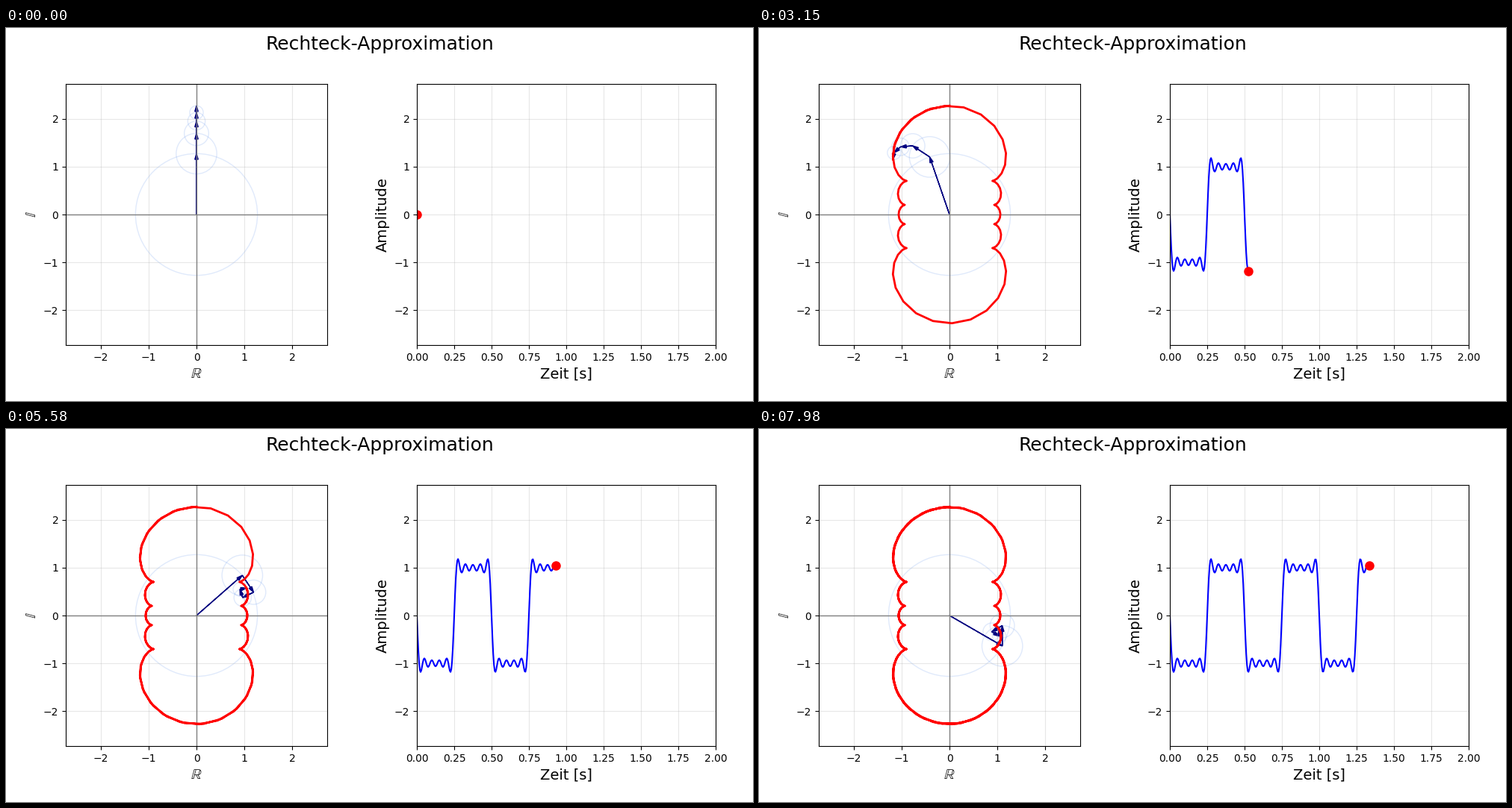
A matplotlib script that plays this animation: 1000x500 px, repeating every 8000 ms.

```python
import numpy as np
import matplotlib.pyplot as plt
from matplotlib.animation import FuncAnimation

LOOP_MS = 8000
FRAMES = 267
FREQ = 2.0
ORDERS = np.arange(1, 10, 2)
RADII = 4 / (np.pi * ORDERS)
LIMIT = 1.2 * RADII.sum()

times = np.linspace(0, 2, 400)
phases = 2 * np.pi * FREQ * np.outer(times, ORDERS)
vectors = 1j * RADII * np.exp(1j * phases)
joints = np.hstack([np.zeros((len(times), 1)), np.cumsum(vectors, axis=1)])
tips = joints[:, -1]

fig = plt.figure(figsize=(10, 5), dpi=100)
fig.suptitle("Rechteck-Approximation", fontsize=18)


def make_axes(rect, xlim, xlabel, ylabel):
    ax = fig.add_axes(rect)
    ax.set_xlim(*xlim)
    ax.set_ylim(-LIMIT, LIMIT)
    ax.set_xlabel(xlabel, fontsize=14)
    ax.set_ylabel(ylabel, fontsize=14)
    ax.grid(alpha=0.3)
    return ax


plane = make_axes([0.08, 0.15, 0.35, 0.7], (-LIMIT, LIMIT),
                  r"$\mathbb{R}$", r"$\mathbb{I}$")
plane.axhline(0, color="gray", lw=1)
plane.axvline(0, color="gray", lw=1)
graph = make_axes([0.55, 0.15, 0.4, 0.7], (0, 2), "Zeit [s]", "Amplitude")

circles = [plane.add_patch(plt.Circle((0, 0), r, fill=False, lw=1,
                                      color="cornflowerblue", alpha=0.2))
           for r in RADII]
arrows = [plane.arrow(0, 0, 0, r, head_width=0.07, head_length=0.12,
                      length_includes_head=True, color="navy")
          for r in RADII]
trace, = plane.plot([], [], color="red", lw=2)
wave, = graph.plot([], [], color="blue", lw=1.5)
dot, = graph.plot([], [], "o", color="red", ms=8)


def update(i):
    for circle, arrow, base, vec in zip(circles, arrows, joints[i], vectors[i]):
        circle.center = base.real, base.imag
        arrow.set_data(x=base.real, y=base.imag, dx=vec.real, dy=vec.imag)
    path = tips[:i + 1]
    trace.set_data(path.real, path.imag)
    wave.set_data(times[:i + 1], path.real)
    dot.set_data([times[i]], [tips[i].real])
    return [*circles, *arrows, trace, wave, dot]


anim = FuncAnimation(fig, update, frames=FRAMES, interval=LOOP_MS / FRAMES,
                     repeat=True, repeat_delay=0)

plt.show()
```
